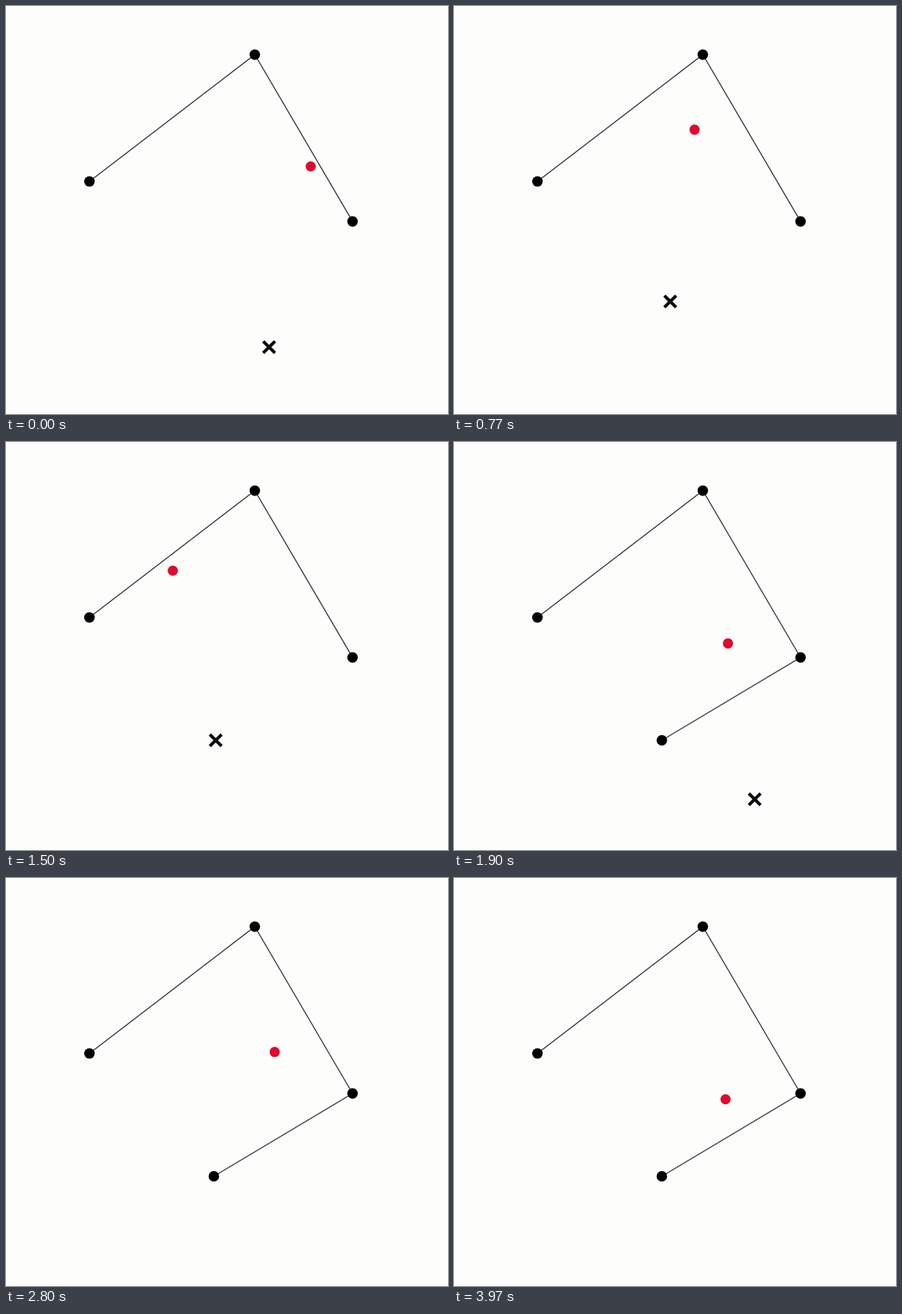
An HTML page with a canvas that plays this animation: 588 by 543 pixels, repeating every 4.01 s.

```html
<!DOCTYPE html>
<html lang="en">
<head>
<meta charset="utf-8">
<title>Bezier curve</title>
<style>
html, body { margin: 0; width: 100%; height: 100%; overflow: hidden; background: #fdfdfc; }
canvas { display: block; }
</style>
</head>
<body>
<canvas id="stage" width="588" height="543"></canvas>
<script>
const ctx = document.getElementById('stage').getContext('2d');
const LOOP = 4010;
const LAST_STEP = 119;
const CLICK = 49;
const EXIT = 62;
const POINTS = [[111, 233.5], [331, 64.7], [461, 286.7], [276.5, 397]];

// Cursor keys: step, x, y
const CURSOR = [
  [0, 350, 454], [13, 285, 397], [32, 290, 390], [45, 279, 397],
  [CLICK, 276.5, 397], [52, 280, 399], [EXIT, 520, 552]
];

const mix = (a, b, u) => a + (b - a) * u;
const mixPoint = (p, q, u) => [mix(p[0], q[0], u), mix(p[1], q[1], u)];

// De Casteljau evaluation for any number of control points
function bezier(pts, u) {
  while (pts.length > 1) {
    pts = pts.slice(1).map((p, i) => mixPoint(pts[i], p, u));
  }
  return pts[0];
}

// Steps last 30 or 40 ms, three per 100 ms
function stepAt(ms) {
  return Math.min(LAST_STEP, Math.floor((Math.floor(ms / 10) + 0.5) * 0.3));
}

function progress(step) {
  return step < 7 ? (step + 24) / 30 : ((step - 7) % 30) / 30;
}

function cursorAt(step) {
  const i = CURSOR.findIndex(k => k[0] > step) - 1;
  const a = CURSOR[i], b = CURSOR[i + 1];
  const u = (step - a[0]) / (b[0] - a[0]);
  const eased = i === 0 ? Math.sin(u * Math.PI / 2) : u * u * (3 - 2 * u);
  return mixPoint(a.slice(1), b.slice(1), eased);
}

function dot([x, y], r, color) {
  ctx.fillStyle = color;
  ctx.beginPath();
  ctx.arc(x, y, r, 0, Math.PI * 2);
  ctx.fill();
}

function cross([x, y]) {
  const s = 7.8;
  ctx.strokeStyle = '#0c0c10';
  ctx.lineWidth = 4.2;
  ctx.beginPath();
  ctx.moveTo(x - s, y - s);
  ctx.lineTo(x + s, y + s);
  ctx.moveTo(x + s, y - s);
  ctx.lineTo(x - s, y + s);
  ctx.stroke();
}

function draw(step) {
  const pts = POINTS.slice(0, step < CLICK ? 3 : 4);
  ctx.fillStyle = '#fdfdfc';
  ctx.fillRect(0, 0, 588, 543);

  ctx.strokeStyle = '#2c2c30';
  ctx.lineWidth = 1.3;
  ctx.beginPath();
  pts.forEach(p => ctx.lineTo(...p));
  ctx.stroke();

  pts.forEach(p => dot(p, 7, '#000'));
  dot(bezier(pts, progress(step)), 6.8, '#de0a2e');
  if (step < EXIT) cross(cursorAt(step));
}

const start = performance.now();
function tick() {
  draw(stepAt((performance.now() - start) % LOOP));
  requestAnimationFrame(tick);
}
tick();
</script>
</body>
</html>
```
